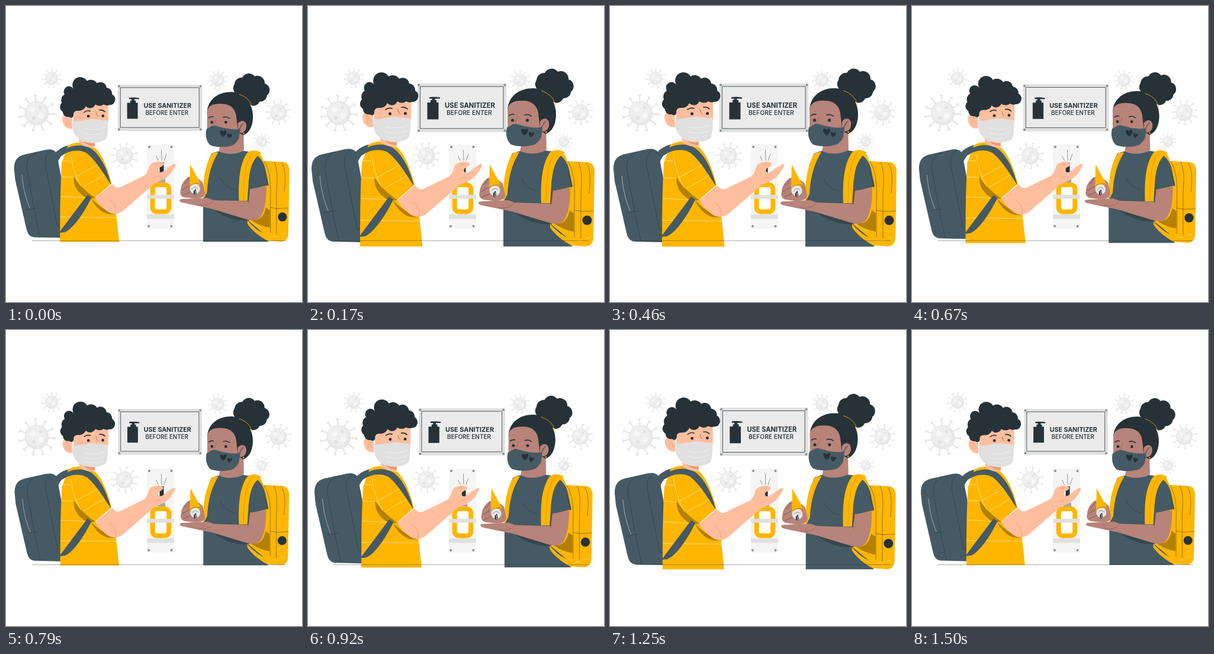
An HTML page for the animation above (1.54 s loop, 500 by 500 pixels).

```html
<!DOCTYPE html>
<html lang="en">
<head>
<meta charset="utf-8">
<title>Use sanitizer</title>
<style>
html, body { margin: 0; width: 100%; height: 100%; overflow: hidden; background: #fff }
svg { display: block; width: 100%; height: 100% }
text { font-family: Inter, sans-serif; fill: #263238 }
.y { fill: #ffb600 } .gold { fill: #b38000 } .slate { fill: #455a64 } .dark { fill: #263238 }
.peach { fill: #ffbe9d } .brown { fill: #b88379 } .grey { fill: #e0e0e0 }
.line { fill: none; stroke: #263238; stroke-width: .5; stroke-linecap: round }
.white { fill: none; stroke: #fff; stroke-width: .5; stroke-linecap: round }
.brow { fill: none; stroke: #263238; stroke-width: 1.7; stroke-linecap: round }
</style>
</head>
<body>
<svg viewBox="0 0 500 500">
  <g id="viruses"></g>

  <g id="sign">
    <path class="grey" d="M184.700 130.700h150.600v82.600H184.700z"/>
    <path d="M189.500 136h140.500v71H189.500z" fill="#ebebeb" stroke="#263238" stroke-width=".8"/>
    <g class="screws" data-at="187,133.500 332.500,133.500 187,210.500 332.500,210.500"></g>
    <path class="dark" d="M201.500 163h5.500v-4h2.500v-2.500h-4.500v-2.500q9-1 18 .5v2h-8.500v2.500h2.500v4h3.500v28.500h-19z"/>
    <text x="231" y="172" font-size="11.3" font-weight="700">USE SANITIZER</text>
    <text x="234" y="184.500" font-size="10.4" font-weight="500">BEFORE ENTER</text>
  </g>

  <g id="dispenser">
    <path d="M238 234h46v142h-46z" fill="#f5f5f5"/>
    <g class="screws" data-at="242,238 279.500,238 241,372 279.500,372"></g>
    <path d="M256 292h13v7h-13z" fill="#a6a6a6"/>
    <path class="dark" d="M259.500 264h7v17h-7z"/>
    <path d="M259 281h7v12h-7z" fill="#d0d0d0"/>
    <rect x="247.700" y="302" width="27.500" height="45.500" rx="7" fill="#fff" stroke="#ffb600" stroke-width="8"/>
    <path class="grey" d="M238 319h46v6.500h-46zM238 352h46v7.500h-46z"/>
    <path class="line" d="M253.500 253.500l4 7.500M262.500 243.500l.5 17.500M271 250l-4 11"/>
  </g>

  <g id="boy">
    <path class="slate" d="M6 276C6 260 12 253 26 250L62 242C72 240 78 242 82 248L104 366C107 386 100 397 88 399L42 398C33 397 30 391 28 383L8 296z"/>
    <path class="line" d="M47 247C33 250 27 262 29 278L42 350 52 397M28 349L47 346M70 245C60 252 60 264 64 280L83 377 104 382"/>
    <path class="white" d="M20 287C22 310 27 330 34 346"/>
    <path class="slate" d="M69 263C76 248 88 236 106 233.500L112 242C98 243 88 252 83 266z"/>
    <path class="y" d="M102 235C108 230 116 229 122 229 132 235 142 238 150 238 165 251 175 282 180 302L151 327C168 345 180 352 188 355L193.500 406.300H88C88 360 88 315 91 265z"/>
    <path class="gold" d="M112 289C112 308 119 318 137 329L151 328C135 317 121 304 112 289zM143 328C152 337 169 352 188 356 168 361 152 346 143 328z"/>
    <path class="white" d="M93 261l13 1M91 290l21 1M90 325l43 2M89 362l101 1M116 290L158 267M130 308L173 283M107 251C110 270 114 287 125 307"/>
    <path class="slate" d="M86 390L137 322 144 327C133 350 113 382 96 389z"/>
    <path class="slate" d="M92 245C105 233 128 230 144 240 160 252 172 275 179 304 168 288 154 263 136 248 122 240 104 243 92 252z"/>

    <path class="peach" d="M181 303C187 310 191 311 197 308L238 288C246 283 245 272 250 267 258 262 268 262 272 265 276 269 269 272 265 274 261 278 265 284 271 281 278 279 285 270 291 267 295 266 295 270 292 274 287 284 280 291 272 295 265 299 260 300 254 304L205 347C192 360 179 358 169 349 160 342 154 335 151 328z"/>
    <path d="M187 355C190 345 184 335 176 331M257 268l8-1M271 281c5-3 9-7 13-10M268 289c-4 0-8 0-12 4" fill="none" stroke="#eb996e" stroke-width=".7"/>

    <path class="peach" d="M122 205L150 220 150 237C142 239 130 236 122 230z"/>
    <path d="M125 220C134 229 142 231 150 230L150 235C139 235 130 230 125 220z" fill="#eb996e"/>
    <path class="peach" d="M116 150H172C175 162 174 176 174 190L171 216C165 228 143 230 128 220 118 212 110 196 112 176z"/>
    <path class="peach" d="M109 183C103 176 93 177 92 187 92 199 101 207 110 204z"/>
    <path d="M97 185c5 0 8 5 9 12M101 190c-1 3-2 4-1 7" fill="none" stroke="#eb996e" stroke-width=".8"/>
    <path class="dark" d="M104 183A9 9 0 0 1 93 174A10 10 0 0 1 91 158A12 12 0 0 1 96 143A9 9 0 0 1 112 133A12 12 0 0 1 136 119A13 13 0 0 1 154 123A11 11 0 0 1 171 131A11 11 0 0 1 181 143A10 10 0 0 1 185 157Q183 162 176 162A12 12 0 0 1 166 161A12 12 0 0 1 151 161A10 10 0 0 1 134 164A13 13 0 0 1 120 172Q111 172 112 181Q110 187 104 183z"/>
    <path class="line" d="M105 189L117 192" style="stroke:#d0d0d0;stroke-width:1.400"/>
    <path class="grey" d="M111 191C126 192 139 186 151 187 159 188 166 190 173 189 174 203 173 216 170 223 158 231 141 231 129 227 113 219 108 206 111 191z"/>
    <path class="white" d="M132 204C145 208 157 206 169 201M130 212C143 217 156 215 167 211M132 221C143 224 155 222 163 219"/>
    <path class="brow" d="M131 175q5-4 11-2M158 171q6-1 10 3"/>
    <path class="line" d="M152 175q1 6 4 8"/>
    <circle class="dark" cx="138.500" cy="182" r="2.500"/><circle class="dark" cx="164.500" cy="181.500" r="2.500"/>
  </g>

  <g id="girl">
    <path class="y" d="M413 246C427 240 434 249 438 262L474 264C482 266 485 273 484 286L482 393C481 402 476 406 468 406L440 404 408 370z"/>
    <path class="gold" d="M414 366C429 370 438 364 442 345L449 350V381C436 379 424 374 414 366z"/>
    <path class="line" d="M457 264C464 278 462 298 461 319V392M439 263C450 279 451 304 450 331V390M450 345l12 2 21-1M470 266C478 275 477 296 475 316"/>
    <path class="white" d="M469 392l8-1M455 396l7 1"/>
    <circle class="dark" cx="471.500" cy="362" r="8"/>

    <path class="slate" d="M345 249C360 242 389 241 414 246 428 250 438 262 441 276L447 305 414 313 411 369 446 398V406.300H330V318C332 290 336 267 345 249z"/>
    <path class="y" d="M409 368C424 386 439 393 452 396L446 405C430 397 416 385 409 374z"/>
    <path d="M342 343C364 351 390 357 418 365 404 374 366 366 342 343z" fill="#37474f"/>
    <path class="line" d="M361 292C365 302 375 310 387 313M439 280l7 26"/>
    <path class="y" d="M346 249Q351 246 357 247C345 266 339 287 337 318L330 331C329 300 333 268 346 249z"/>
    <path class="y" d="M409 247C418 241 429 243 434 248 418 257 413 276 411 303L409 333H394C393 301 394 268 409 247z"/>
    <path class="line" d="M420 246C407 258 403 283 402 333" style="stroke:#b38000"/>

    <path class="brown" d="M414 312L443 307C443 329 441 348 433 361 428 368 418 369 407 366L344 347C324 343 304 339 291 336 286 333 287 330 294 330L338 328 349 332 411 334z"/>
    <path class="line" d="M413 313L411 337M321 340C330 343 344 340 348 333" style="stroke:#81483c"/>
    <path class="brown" d="M305 290C297 294 290 305 290 314 288 320 290 325 296 327L312 329C325 330 333 327 333 319L329 300 322 294z"/>
    <path class="y" d="M307 268L326 303C320 307 313 309 306 309z"/>
    <circle cx="315.500" cy="312" r="9" fill="#e8e8e8"/>
    <path class="line" d="M307 306c6-4 13-5 18-3M310 312q5-7 11-1M296 302q6-2 8-10M292 314l12-7M294 323l13-6"/>
    <path class="dark" d="M313 316l4-4 1 8-2 3-3-2z"/>
    <path d="M316 315v7" stroke="#e0e0e0"/>

    <path class="brown" d="M365 213L402 207 403 243C390 251 370 251 358 245z"/>
    <path d="M364 234C377 234 389 227 395 218 395 228 382 236 362 237z" fill="#975a4c"/>
    <path class="dark" d="M391 143A12 12 0 0 1 386 125A13 13 0 0 1 400 113A13 13 0 0 1 422 111A13 13 0 0 1 440 124A12 12 0 0 1 444 145A12 12 0 0 1 431 156A12 12 0 0 1 416 163z"/>
    <path class="dark" d="M337 176C338 151 359 138 382 139 406 141 420 163 419 185 418 202 412 212 402 216L388 208 370 175z"/>
    <path d="M394 143C408 148 416 156 418 168" fill="none" stroke="#ffb600" stroke-width=".8"/>
    <path class="brown" d="M337 176C337 164 348 159 363 160 378 160 387 168 389 181L392 207 389 222 353 233 337 217z"/>
    <path class="brown" d="M392 195C399 186 409 191 407 202 406 211 397 215 392 209z"/>
    <path class="line" d="M403 195c-5 0-7 5-6 10" style="stroke:#81483c"/>
    <circle cx="402.500" cy="213" r="1.300" fill="#ffb600"/>
    <path class="line" d="M393 207L401 195" style="stroke:#455a64;stroke-width:1.300"/>
    <path class="slate" d="M336 205C342 203 345 198 351 199 363 202 375 207 396 205 396 217 392 229 383 234 371 238 354 238 343 234 336 228 333 216 336 205z"/>
    <path id="heart" class="dark" d="M366 219C358 213 359 206 363 207.500Q365 208 366 210 369 205 371.500 208.500 373 213 366 219z"/>
    <use href="#heart" transform="translate(377 217.500) rotate(12) scale(.72) translate(-366 -213)"/>
    <path class="brow" d="M340 185q4-3 8-2M366 184q6-2 11 2"/>
    <path class="line" d="M354 187q-3 6-4 9" style="stroke:#81483c"/>
    <circle class="dark" cx="345.500" cy="193" r="2.600"/><circle class="dark" cx="370.500" cy="193" r="2.600"/>
  </g>

  <path class="line" d="M44 396.500H474" style="stroke-width:.4"/>
</svg>
<script>
const LOOP = 1540, FRAMES = 37, DRAWN_SCALE = 1.066;
const $ = id => document.getElementById(id);
const circle = (x, y, r, fill, extra = '') => `<circle cx="${x}" cy="${y}" r="${r}" fill="${fill}" ${extra}/>`;

function virus(x, y, r, turn) {
  let spikes = '';
  for (let i = 0; i < 11; i++)
    spikes += `<path d="M.8 0H1.480M1.480-.1V.1" transform="rotate(${turn + i * 360 / 11})"/>`;
  return `<g transform="translate(${x} ${y}) scale(${r})">
    <g fill="none" stroke="#e4e4e4" stroke-width=".1" stroke-linecap="round">${spikes}</g>
    ${circle(0, 0, 1, '#e8e8e8')}${circle(-.08, -.1, .82, '#efefef')}
    ${circle(-.35, -.3, .22, '#f7f7f7')}${circle(.3, -.45, .13, '#e2e2e2')}
    ${circle(.35, .2, .23, '#f7f7f7')}${circle(-.25, .4, .16, '#e2e2e2')}</g>`;
}
$('viruses').innerHTML = [
  [77, 122, 11, 10], [52, 181, 20.500, 4], [200, 253, 14.500, 20],
  [358, 125, 11, 10], [460, 180, 14, 20], [432, 229, 9, 8]
].map(v => virus(...v)).join('');

for (const group of document.querySelectorAll('.screws'))
  group.innerHTML = group.dataset.at.split(' ').map(p => {
    const [x, y] = p.split(',');
    return circle(x, y, 1.600, '#bdbdbd', 'stroke="#455a64" stroke-width=".6"') + circle(x, y, .6, '#455a64');
  }).join('');

// Pulse strength over the loop: [ms, 0..1]
const beat = [[0, .09], [170, .67], [240, .9], [315, 1], [390, .88], [460, .66], [670, .22], [795, .02],
  [920, .3], [1080, .85], [1130, 1], [1250, .51], [1400, .15], [1500, 0], [1540, .09]];
function pulse(t) {
  const i = beat.findIndex(([time]) => time > t);
  const [t0, a] = beat[i - 1], [t1, b] = beat[i];
  return a + (b - a) * (t - t0) / (t1 - t0);
}

const pivots = { sign: [260, 172], boy: [150, 260.500], girl: [385.500, 256.500] };
function draw() {
  const step = Math.floor(performance.now() % LOOP / LOOP * FRAMES);
  const scale = (1 + .1 * pulse(step * LOOP / FRAMES)) / DRAWN_SCALE;
  for (const [id, [x, y]] of Object.entries(pivots))
    $(id).setAttribute('transform', `translate(${x} ${y}) scale(${scale}) translate(${-x} ${-y})`);
  requestAnimationFrame(draw);
}
draw();
</script>
</body>
</html>
```
